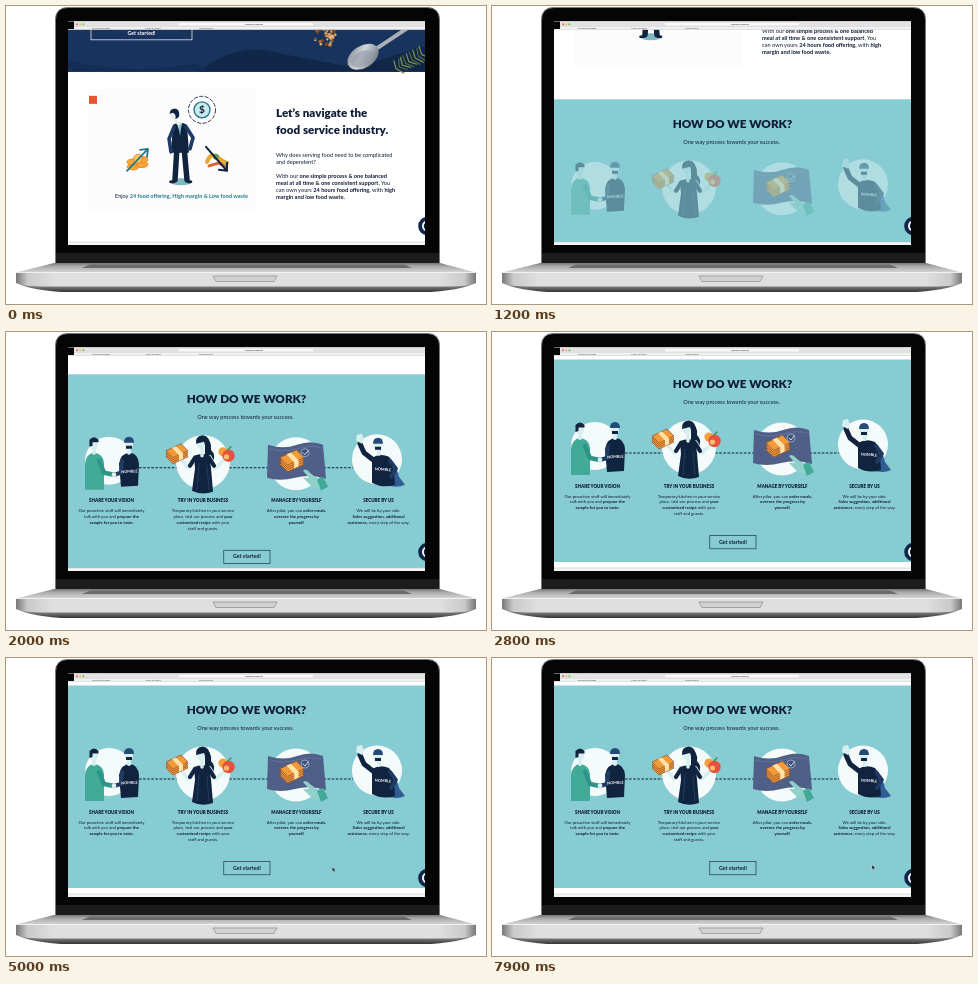
An HTML page that plays this animation: 480 by 298 pixels, repeating every 8000 ms.

```html
<!DOCTYPE html>
<html lang="en">
<head>
<meta charset="utf-8">
<title>Laptop with scrolling page</title>
<style>
html, body { margin: 0; width: 100%; height: 100%; overflow: hidden; background: #fff; }
svg { display: block; width: 100vw; height: 100vh; }
text { font-family: Lato, "Open Sans", sans-serif; fill: #0f1c36; }
.b { font-weight: 700; }
.h { font-weight: 900; }
.mid { text-anchor: middle; }
.tiny { font-size: 2.3px; fill: #444; }
</style>
</head>
<body>
<svg viewBox="0 0 480 298" xmlns="http://www.w3.org/2000/svg">
<defs>
  <clipPath id="screen"><rect x="62" y="15.500" width="357" height="223.500"/></clipPath>
  <clipPath id="page"><rect x="62" y="23.500" width="357" height="212.500"/></clipPath>
  <linearGradient id="silver" x2="1">
    <stop offset="0" stop-color="#777"/><stop offset=".025" stop-color="#cacacb"/>
    <stop offset=".08" stop-color="#dfdfe0"/><stop offset=".92" stop-color="#dfdfe0"/>
    <stop offset=".975" stop-color="#cacacb"/><stop offset="1" stop-color="#777"/>
  </linearGradient>
  <linearGradient id="deck" x2="0" y2="1">
    <stop offset="0" stop-color="#777"/><stop offset=".35" stop-color="#aaa"/><stop offset="1" stop-color="#d6d6d6"/>
  </linearGradient>
  <linearGradient id="under" x2="0" y2="1">
    <stop offset="0" stop-color="#aaa"/><stop offset=".5" stop-color="#777"/><stop offset="1" stop-color="#333"/>
  </linearGradient>
  <linearGradient id="steel" x2="1" y2="1">
    <stop offset="0" stop-color="#777f8a"/><stop offset=".45" stop-color="#d3d6da"/><stop offset="1" stop-color="#59616e"/>
  </linearGradient>
</defs>

<g id="laptop">
  <path d="M49.500 258V14Q49.500 1.500 62 1.500H421Q433.500 1.500 433.500 14V258Z" fill="#050505" stroke="#77797b"/>
  <rect x="50" y="247" width="383" height="10" fill="#1c1c1d"/>
  <path d="M48 257H434L470 266.500H10Z" fill="url(#deck)"/>
  <path d="M84 258.500H398L406 262H76Z" fill="#6c6c6e"/>
  <path d="M10 276H470Q462 283 425 286H55Q18 283 10 276Z" fill="url(#under)"/>
  <path d="M10 266.500H470V277Q463 280.500 440 280.500H40Q17 280.500 10 277Z" fill="url(#silver)"/>
  <path d="M10 266.500H470" stroke="#f7f7f7" stroke-width=".8"/>
  <path d="M207 270H271L268 275.500H210Z" fill="#d2d2d2" stroke="#8b8b8b" stroke-width=".7"/>
</g>

<g clip-path="url(#screen)">
  <rect x="62" y="15" width="357" height="224" fill="#fff"/>
  <g clip-path="url(#page)">
    <g id="scroller">
      <g id="banner"></g>
      <g id="intro"></g>
      <g id="steps"></g>
    </g>
  </g>
  <g id="chat">
    <circle cx="421.500" cy="220" r="9.300" fill="#12264c"/>
    <circle cx="421.500" cy="220" r="4.600" fill="none" stroke="#fff" stroke-width="1.800"/>
  </g>
  <g id="chrome">
    <rect x="62" y="15" width="357" height="8.500" fill="#f1f1f1"/>
    <rect x="62" y="15" width="357" height="5.300" fill="#e3e3e3"/>
    <rect x="173" y="17" width="134" height="2.600" rx=".6" fill="#fafafa"/>
    <path d="M62 20.300H419M62 23.500H419" stroke="#c9c9c9" stroke-width=".5"/>
    <rect x="62" y="15" width="6" height="8" fill="#050505"/>
    <circle cx="71" cy="18.200" r="1" fill="#f2645a"/>
    <circle cx="74.200" cy="18.200" r="1" fill="#f5bf4f"/>
    <circle cx="77.400" cy="18.200" r="1" fill="#62c554"/>
    <text class="tiny mid" x="248" y="19.200" style="fill:#222">mealplan.example</text>
    <text class="tiny mid" x="95" y="23">Our kitchen pages</text>
    <text class="tiny mid" x="147" y="23">Meals for today</text>
    <text class="tiny mid" x="200" y="23">Food services</text>
    <rect x="62" y="236" width="357" height="3" fill="#f4f4f4"/>
    <path d="M62 236H419" stroke="#b9bec1" stroke-width=".5"/>
  </g>
  <g id="hand">
    <path d="M-.8 0Q0-.9.8 0V2.300L3 3V5.200L2.300 7H-1.200L-2.600 4.200Q-2 3.300-.8 4.300Z" fill="#fff" stroke="#111" stroke-width=".8"/>
  </g>
  <path id="arrow" d="M0 0V4.200L1 3.300L1.800 5L2.600 4.600L1.900 3H3.200Z" fill="#111" stroke="#fff" stroke-width=".25"/>
</g>
</svg>

<script>
const LOOP = 8000, SCROLL = 211, SCROLL_TIME = 2720;
const NAVY = '#10233f', INK = '#0f1c36', TEAL = '#88ccd3', GREEN = '#43aa98', SKIN = '#d7eff0';
const $ = id => document.getElementById(id);
const clamp = v => Math.max(0, Math.min(1, v));
const span = (t, a, b) => clamp((t - a) / (b - a));
const smooth = k => k * k * (3 - 2 * k);
const mix = (a, b, k) => a + (b - a) * k;

// *starred* parts become bold
const text = (x, y, size, str, cls = '', extra = '') =>
  `<text x="${x}" y="${y}" font-size="${size}" class="${cls}" ${extra}>` +
  str.replace(/&/g, '&amp;').replace(/\*(.+?)\*/g, '<tspan class="b">$1</tspan>') + '</text>';
const lines = (x, y, size, gap, rows, cls) =>
  rows.map((row, i) => text(x, y + i * gap, size, row, cls)).join('');
const path = (d, fill, extra = '') => `<path d="${d}" fill="${fill}" ${extra}/>`;
const line = (d, color, width, extra = '') =>
  path(d, 'none', `stroke="${color}" stroke-width="${width}" stroke-linecap="round" stroke-linejoin="round" ${extra}`);
const dot = (x, y, r, fill, extra = '') => `<circle cx="${x}" cy="${y}" r="${r}" fill="${fill}" ${extra}/>`;
const box = (x, y, w, h, fill, extra = '') => `<rect x="${x}" y="${y}" width="${w}" height="${h}" fill="${fill}" ${extra}/>`;
const at = (x, y, turn, inner) => `<g transform="translate(${x} ${y}) rotate(${turn})">${inner}</g>`;

function seeded(seed) {
  return () => (seed = seed * 16807 % 2147483647) / 2147483647;
}

function banner() {
  const rnd = seeded(41);
  let out = box(62, -60, 357, 126, '#17335e') +
    path('M192 66Q230 38 262 45T350 62L419 40V66Z', '#112747') +
    path('M62 66V54Q120 70 190 58L204 66Z', '#142d54');
  const nuts = ['#a86b35', '#d19a58', '#79461f', '#e0b77c'];
  for (let i = 0; i < 48; i++) {
    const a = rnd() * 6.3, r = Math.sqrt(rnd()) * 11;
    out += dot(319 + r * Math.cos(a), 30 + r * Math.sin(a), 1 + rnd(), nuts[i % 4]);
  }
  out += line('M370 43L414 14', '#a9afb7', 4) +
    at(357, 51, -32, '<ellipse rx="17" ry="11" fill="url(#steel)"/><ellipse cx="-2" cy="1" rx="12" ry="7" fill="#929aa5" opacity=".6"/>');
  for (let i = 0; i < 9; i++) {
    const x = 390 + i * 3.2, y = 63 - i * 1.8;
    out += line(`M${x} ${y}l${-3 + rnd() * 3} -8M${x} ${y}l8 ${2 + rnd() * 3}`, i % 2 ? '#506f3e' : '#80954f', 1.2);
  }
  return out + box(85, 10, 101, 24, 'none', 'stroke="#fff" stroke-width=".7"') +
    text(135.5, 29, 5.3, 'Get started!', 'b mid', 'style="fill:#fff"');
}

function intro() {
  const coins = [0, 1, 2, 3].map(i =>
    `<ellipse cx="${127 + i % 2 * 9}" cy="${161 - i * 2.4}" rx="6" ry="3.2" fill="#f6a93a" stroke="#dc7d20" stroke-width=".7"/>`).join('');
  const extras = dot(196, 104, 13.5, '#fff', `stroke="${NAVY}" stroke-width=".9" stroke-dasharray="4 1.5"`) +
    dot(196, 104, 8, '#c8e9ed', 'stroke="#27798a" stroke-width="1.4"') +
    text(196, 107.5, 10, '$', 'b mid') +
    coins + dot(132, 153, 4.4, '#ffc45c', 'stroke="#dc7d20" stroke-width=".8"') +
    line('M121 165L141 144M134 144L142 143L141 151', '#247b8b', 1.8) +
    line('M201 156Q205 146 211 151T221 157', '#e9a72c', 4) +
    line('M203 160L213 157L220 161', '#dc6331', 3) + dot(210, 151, 3, '#62a34f') +
    line('M200 141L220 164M213 164L221 165L221 157', NAVY, 2) +
    text(109, 192, 5.55, 'Enjoy <tspan class="b" style="fill:#217a91">24 food offering, High margin & Low food waste</tspan>');
  const man = '<ellipse cx="175" cy="176" rx="11" ry="3.500" fill="#7eb6c1"/>' +
    line('M171 141L169 174M178 141L181 174', NAVY, 5.5) +
    line('M168 176H164.500M182 176H185', NAVY, 2.6) +
    path('M167 119Q174 115 181 119L183 147H165Z', NAVY) +
    line('M168 121L163 133L165 146', '#1d3a65', 3.6) +
    line('M180 121L187 132L184 143', '#1d3a65', 3.6) +
    path('M171 117H176L174 128Z', '#dff2f3') + line('M174 119V129', '#2e93a0', 1) +
    dot(168.5, 109, 4.3, '#e5f0ed') + path('M163.500 108Q164 102 170 103Q174 104 173 111L169 114Q171 109 167 107Z', NAVY) +
    line('M169 114L172 118', '#e5f0ed', 2.5);
  return box(82, 83, 168, 122, '#fcfcfc') + box(83, 90, 8, 8, '#e8542f') +
    `<g id="extras">${extras}</g><g id="man">${man}</g>` +
    lines(270, 111, 11.6, 17.5, ['Let’s navigate the', 'food service industry.'], 'h') +
    lines(270, 151, 5.65, 7, ['Why does serving food need to be complicated', 'and dependent?']) +
    lines(270, 172, 5.65, 7, ['With our *one simple process & one balanced*',
      '*meal at all time & one consistent support*, You',
      'can own yours *24 hours food offering,* with *high*', '*margin and low food waste.*']);
}

const brand = (x, y, turn) => at(x, y, turn, text(0, 0, 3.9, 'NOMBLE', 'b mid', 'style="fill:#fff"'));

// a slanted pile of banded notes
const cash = (x, y, k) => `<g transform="translate(${x} ${y}) scale(${k})" stroke="#8f4f2c" stroke-width=".7" stroke-linejoin="round">` +
  [4, 2, 0, -2].map(o => path(`M-11 ${o}L4 ${o - 7}L11 ${o}L-4 ${o + 7}Z`, '#f19a3a')).join('') +
  path('M-5 -5L-1 -6.500L6 .5L6 6L2 8V2.500Z', '#ffe3a8', 'stroke="none"') + '</g>';
const head = (x, y, face) => path(`M${x - 4} ${y - 3}H${x + 4}V${y + 2}Q${x + 3} ${y + 6} ${x} ${y + 6}T${x - 4} ${y + 2}Z`, SKIN) +
  path(`M${x - 4.5 * face} ${y + 3}V${y - 4}Q${x} ${y - 9} ${x + 4.5 * face} ${y - 4}V${y - 1.5}H${x - 1.5 * face}V${y + 2}Z`, NAVY);
const capped = (x, y) => path(`M${x - 4} ${y - 3}H${x + 4}V${y + 2}Q${x + 3} ${y + 6} ${x} ${y + 6}T${x - 4} ${y + 2}Z`, SKIN) +
  path(`M${x - 5} ${y - 1}Q${x - 5} ${y - 7} ${x} ${y - 7}T${x + 5} ${y - 1}Z`, '#244a78') + path(`M${x - 3} ${y + 2}H${x + 3}V${y + 5}H${x - 3}Z`, NAVY);

function icons() {
  const greet = dot(103, 114, 24, '#f5fbfb') +
    path('M79 143V117Q80 107 88 106Q97 107 98 116L98 143Z', GREEN) +
    line('M93 114L98 126L108 128', '#2d9488', 4.5) + line('M88 101V106', SKIN, 4) + head(88, 97, 1) +
    path('M115 140L113 117Q115 106 124 106Q132 107 133 117L132 139Z', NAVY) +
    line('M116 114L115 126L108 128', '#203b62', 4) + dot(108, 128, 2.4, SKIN) +
    line('M123 101V106', SKIN, 4) + capped(123, 97) + brand(123.5, 126, -3);
  const cook = dot(197, 115.5, 27, '#f5fbfb') +
    path('M199 92Q206 93 205 103Q211 109 206 116L199 110Z', NAVY) +
    path('M188 109Q195 106 203 108L205 121L207 145Q196 149 186 144L189 122Z', NAVY) +
    line('M188 110L182 121L174 111', SKIN, 3.2) + line('M204 110L210 121L218 113', SKIN, 3.2) +
    line('M189 111L184 119M203 111L208 119', NAVY, 4.2) + line('M196 102V109', SKIN, 3.4) +
    dot(195, 98, 4.2, SKIN) + path('M190 97Q189 89 197 88.500Q205 90 204 101L201 104L198 95Z', NAVY) +
    line('M193 117L191 143M201 119L203 143', '#2b4971', .7) + cash(171, 106, 1) +
    dot(217, 105, 4.6, '#f2a13c') + dot(222.5, 109, 6.2, '#e8503f') + dot(220.5, 110, 2.6, '#f6c06a') +
    line('M222 103L225 100', '#498d49', 1.5);
  const manage = dot(290, 117, 26.5, '#f5fbfb') +
    path('M262 98Q277 103 291 98T317 98L320 132Q304 127 289 131T261 131Z', '#4f5f88') +
    line('M264 102Q277 106 291 102T315 101', '#6b7a9e', .7) + cash(286, 113, 1.1) +
    dot(299, 106, 4, '#3b4d78', 'stroke="#b5c4d8" stroke-width=".7"') + line('M297 106L299 108L302 104', '#eaf4f5', .9) +
    path('M297 124Q300 121 304 126L309 130L316 133L318 142L306 140L297 131L303 131Z', '#8fd0c8') +
    path('M311 133L317 130L322 140L315 144Z', GREEN);
  const secure = dot(371, 112.5, 25, '#f5fbfb') +
    path('M383 110Q391 120 393 130L399 138Q391 142 380 138Z', '#315d95') +
    path('M366 111Q374 106 383 110L388 125L389 138Q377 142 366 136Z', NAVY) +
    line('M367 113L358 106L354 97', NAVY, 5) + path('M350 94L351 88L356 87L358 93L356 97Z', SKIN) +
    line('M384 114L390 122L385 130', '#203b62', 3.8) + line('M373 102V107', SKIN, 4) +
    capped(372, 98) + brand(377, 124, 4);
  return greet + cook + manage + secure;
}

function steps() {
  const column = (x, title, rows) => text(x, 155.5, 4.5, title, 'h mid') + lines(x, 165.5, 4.25, 5.9, rows, 'mid');
  const captions = column(105.5, 'SHARE YOUR VISION', ['Our proactive staff will immediately', 'talk with you and *prepare the*', '*sample for you to taste.*']) +
    column(197, 'TRY IN YOUR BUSINESS', ['Temporary kitchen in your service', 'place, trial our process and *your*', '*customised recipe* with your', 'staff and guests.']) +
    column(290.5, 'MANAGE BY YOURSELF', ['After pilot, you can *order meals,*', '*oversee the progress by*', '*yourself.*']) +
    column(372.5, 'SECURE BY US', ['We will be by your side.', '*Sales suggestion, additional*', '*assistance,* every step of the way.']);
  const inner = box(62, 27.5, 357, 202.5, TEAL) +
    text(240.5, 56.3, 11.7, 'HOW DO WE WORK?', 'h mid') +
    text(239.5, 72.3, 5.6, 'One way process towards your success.', 'mid') +
    `<g id="link">${path('M133 121H347', 'none', `stroke="${INK}" stroke-width="1" stroke-dasharray="2.6 1.5"`)}</g>` +
    `<g id="icons">${icons()}</g><g id="captions">${captions}</g>` +
    box(217.8, 203.5, 46.2, 13.3, '#fff', `id="button" stroke="${INK}" stroke-width=".6"`) +
    text(241, 211.5, 5.3, 'Get started!', 'b mid');
  return `<g transform="translate(0 ${SCROLL})">${inner}</g>`;
}

$('banner').innerHTML = banner();
$('intro').innerHTML = intro();
$('steps').innerHTML = steps();

const set = (id, name, value) => $(id).setAttribute(name, value);
const place = (id, x, y) => set(id, 'transform', `translate(${x.toFixed(2)} ${y.toFixed(2)})`);

function render(t) {
  const k = span(t, 0, SCROLL_TIME);
  place('scroller', 0, -SCROLL * (1 - (1 - k) ** 2));

  const slide = smooth(span(t, 600, 950));
  place('man', -16 * slide, 0);
  set('extras', 'opacity', 1 - slide);
  set('icons', 'opacity', span(t, 1000, 1550));
  set('link', 'opacity', span(t, 1350, 1800));
  set('captions', 'opacity', span(t, 1250, 1750));

  const hover = span(t, 3500, 3700) * (1 - span(t, 4700, 4900));
  set('button', 'fill-opacity', hover);
  set('button', 'stroke-opacity', 1 - hover);

  const come = smooth(span(t, 3000, 3600)), go = smooth(span(t, 4600, 5300));
  const x = mix(mix(290, 243, come), 380, go);
  const y = mix(mix(226, 212.5, come), 207, go);
  const onButton = t >= 3500 && t < 4700;
  place('hand', x, y);
  place('arrow', x, y);
  set('hand', 'opacity', onButton ? 1 : 0);
  set('arrow', 'opacity', t >= 3000 && !onButton ? 1 : 0);
}

const start = performance.now();
function tick() {
  render((performance.now() - start) % LOOP);
  requestAnimationFrame(tick);
}
render(0);
requestAnimationFrame(tick);
</script>
</body>
</html>
```
